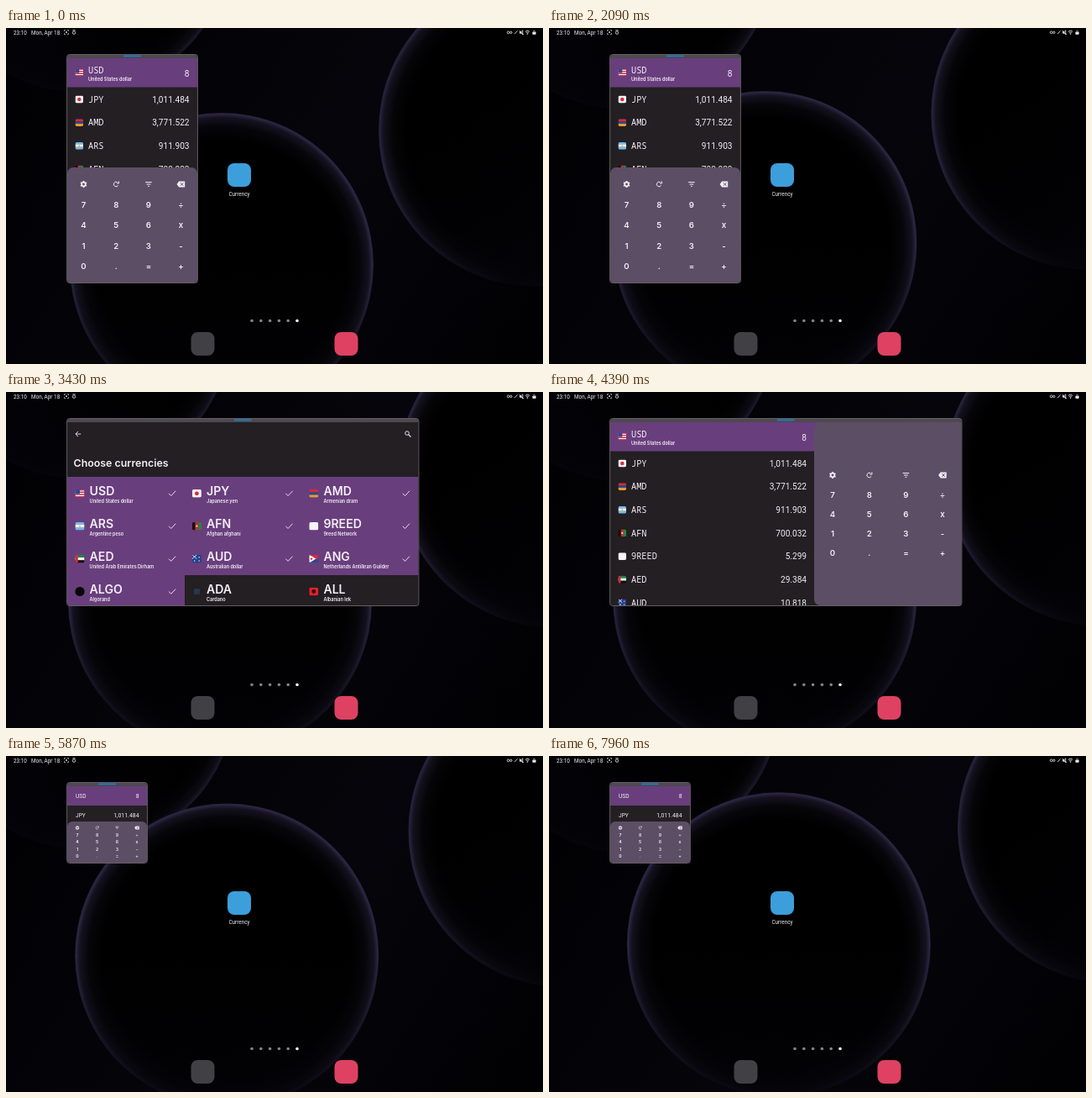
An HTML page with a canvas that plays this animation: 640 by 400 pixels, repeating every 8000 ms.

```html
<!DOCTYPE html>
<html lang="en">
<head>
<meta charset="utf-8">
<title>Currency window resizing</title>
<style>
  html, body { margin: 0; width: 100%; height: 100%; overflow: hidden; background: #000; }
  canvas { display: block; width: 640px; height: 400px; }
</style>
</head>
<body>
<canvas width="640" height="400"></canvas>
<script>
const ctx = document.querySelector('canvas').getContext('2d');
const LOOP = 8000, TAU = Math.PI * 2;
const LEFT = 73, TOP = 32;
const PURPLE = '#693e7d', DARK = '#231f23', PAD = '#5c4e65', WHITE = '#f4eef6';
const SANS = 'Roboto, sans-serif', ROUND = 'Inter, sans-serif', MONO = '"Noto Sans Mono", monospace';

const currencies = [
  ['USD', 'United States dollar', '8'],
  ['JPY', 'Japanese yen', '1,011.484'],
  ['AMD', 'Armenian dram', '3,771.522'],
  ['ARS', 'Argentine peso', '911.903'],
  ['AFN', 'Afghan afghani', '700.032'],
  ['9REED', '9reed Network', '5.299'],
  ['AED', 'United Arab Emirates Dirham', '29.384'],
  ['AUD', 'Australian dollar', '10.818'],
  ['ANG', 'Netherlands Antillean Guilder', ''],
  ['ALGO', 'Algorand', ''],
  ['ADA', 'Cardano', ''],
  ['ALL', 'Albanian lek', '']
];

const layouts = {
  tall: { w: 155, h: 271, pad: [73, 166, 155, 137], radii: [7, 7, 0, 0], cols: [92.5, 38.7], rows: [186, 24.4], key: 9.6, right: 218.5 },
  wide: { w: 418.5, h: 222, pad: [316, 36, 176, 218], radii: [7, 0, 0, 7], cols: [338, 43.7], rows: [99, 23.1], key: 9.6, right: 307 },
  small: { w: 95, h: 95, pad: [73, 78, 95, 49], radii: [6, 6, 0, 0], cols: [85, 23.7], rows: [85.5, 8.5], key: 5.2, right: 158.5 }
};

// start time, layout, page
const scenes = [
  [0, 'tall', calculator], [620, 'tall', chooser], [1900, 'tall', calculator],
  [2690, 'wide', calculator], [3050, 'wide', chooser], [4300, 'wide', calculator],
  [5330, 'small', calculator], [6050, 'small', chooser], [7150, 'small', calculator]
];

// time, then the centres of the three planets
const drift = [
  [0, 257, 282, 629, 122, 88, -105],
  [1170, 258, 264, 636, 108, 86, -90],
  [2650, 257, 251, 643, 98, 88, -82],
  [3430, 255, 250, 652, 95, 88, -78],
  [5260, 259, 243, 661, 91, 91, -72],
  [6780, 269.5, 229.5, 669.5, 88, 94, -68],
  [8000, 274, 224, 672, 85, 95, -66]
];

const clamp = v => Math.max(0, Math.min(1, v));
const mix = (a, b, k) => a + (b - a) * k;
const ease = k => k * k * (3 - 2 * k);

function driftAt(t) {
  const i = Math.max(1, drift.findIndex(row => row[0] >= t));
  const a = drift[i - 1], b = drift[i], k = (t - a[0]) / (b[0] - a[0]);
  return a.map((v, n) => mix(v, b[n], k)).slice(1);
}

function rect(x, y, w, h, color, radius = 0) {
  ctx.fillStyle = color;
  ctx.beginPath();
  ctx.roundRect(x, y, w, h, radius);
  ctx.fill();
}

function disc(x, y, r, color) {
  ctx.fillStyle = color;
  ctx.beginPath();
  ctx.arc(x, y, r, 0, TAU);
  ctx.fill();
}

function polygon(points, color) {
  ctx.fillStyle = color;
  ctx.beginPath();
  points.forEach(([x, y]) => ctx.lineTo(x, y));
  ctx.fill();
}

function line(points, width = 1.1, color = WHITE) {
  ctx.strokeStyle = color;
  ctx.lineWidth = width;
  ctx.beginPath();
  points.forEach(([x, y]) => ctx.lineTo(x, y));
  ctx.stroke();
}

function ring(x, y, r, width, from = 0, to = TAU) {
  ctx.strokeStyle = WHITE;
  ctx.lineWidth = width;
  ctx.beginPath();
  ctx.arc(x, y, r, from, to);
  ctx.stroke();
}

// y is the middle of the capitals
function text(str, x, y, size, family, { weight = 400, align = 'left', color = WHITE } = {}) {
  ctx.font = `${weight} ${size}px ${family}`;
  ctx.textAlign = align;
  ctx.fillStyle = color;
  ctx.fillText(str, x, y + size * .36);
}

function clipped(x, y, w, h, radius, draw) {
  ctx.save();
  ctx.beginPath();
  ctx.roundRect(x, y, w, h, radius);
  ctx.clip();
  draw();
  ctx.restore();
}

// The rim darkens from the first offset to the second, both in radii.
function planet(x, y, r, bright, x0, y0, x1, y1) {
  const body = ctx.createRadialGradient(x, y, 0, x, y, r);
  const stops = [[0, 0], [.82, 0], [.91, .1], [.97, .36], [.992, .75], [1, .6]];
  for (const [at, v] of stops) {
    const k = v * bright;
    body.addColorStop(at, `rgb(${58 * k},${51 * k},${88 * k})`);
  }
  disc(x, y, r, body);
  const shade = ctx.createLinearGradient(x + x0 * r, y + y0 * r, x + x1 * r, y + y1 * r);
  shade.addColorStop(0, 'rgba(3,3,7,0)');
  shade.addColorStop(1, 'rgba(3,3,7,.95)');
  disc(x, y, r + .5, shade);
}

function wallpaper(t) {
  const [ax, ay, bx, by, cx, cy] = driftAt(t);
  const sky = ctx.createLinearGradient(0, 0, 640, 400);
  sky.addColorStop(0, '#010103');
  sky.addColorStop(.55, '#05050b');
  sky.addColorStop(1, '#010103');
  rect(0, 0, 640, 400, sky);
  planet(cx, cy, 181, .6, .6, .4, -.2, .9);
  planet(bx, by, 185, .9, -.7, .1, -.1, .95);
  planet(ax, ay, 181, 1, 0, 0, 0, 1.05);
}

function statusBar() {
  text('23:10', 9, 5.2, 6.4, SANS);
  text('Mon, Apr 18', 30, 5.2, 6.4, SANS);
  for (const [sx, sy] of [[-1, -1], [1, -1], [1, 1], [-1, 1]])
    line([[72 + sx, 5 + sy * 2.5], [72 + sx * 2.5, 5 + sy * 2.5], [72 + sx * 2.5, 5 + sy]], .6);
  disc(72, 5, .9, WHITE);
  ring(81, 5.6, 1.7, .8);
  line([[79.3, 2.8], [82.7, 2.8]], .8);
  ring(598.6, 5.3, 1.4, .8);
  ring(601.8, 5.3, 1.2, .8);
  line([[606, 7.2], [609.5, 3.4]], .8);
  rect(612, 4.2, 2, 2.2, WHITE);
  line([[613, 5.3], [615.8, 2.8], [615.8, 7.8], [613, 5.3]], .8);
  line([[611.8, 2.8], [617, 8]], .7);
  ring(621.5, 7, 3.7, .9, -2.35, -.8);
  ring(621.5, 7, 1.9, .9, -2.35, -.8);
  disc(621.5, 7, .8, WHITE);
  rect(627.5, 4.8, 4, 3, WHITE, .5);
  ring(629.5, 4.6, 1.2, .7, Math.PI, TAU);
}

function home() {
  statusBar();
  rect(264, 161, 28, 28, '#3c9fdb', 8);
  text('Currency', 278, 198, 6.4, SANS, { align: 'center' });
  for (let i = 0; i < 6; i++) disc(293 + i * 10.8, 348.5, 1.8, i < 5 ? '#858588' : '#fff');
  rect(220.5, 362, 28, 28, '#414044', 8);
  rect(391.5, 362, 28, 28, '#df4162', 8);
}

function flag(code, cx, cy, w, h) {
  const x = cx - w / 2, y = cy - h / 2;
  const rows = (...colors) => colors.forEach((c, i) => rect(x, y + i * h / colors.length, w, h / colors.length + .1, c));
  const columns = (...colors) => colors.forEach((c, i) => rect(x + i * w / colors.length, y, w / colors.length + .1, h, c));
  const red = '#d6293c', white = '#f5f5f5', blue = '#30488f';
  const designs = {
    USD() { rows(red, white, red, white, red, white, red); rect(x, y, w * .5, h * .55, blue); },
    JPY() { rows(white); disc(cx, cy, h * .25, red); },
    AMD() { rows(red, blue, '#e99b28'); },
    ARS() { rows('#76b7e6', white, '#76b7e6'); disc(cx, cy, 1, '#e6b23b'); },
    AFN() { columns('#111', '#c62d2d', '#27843c'); disc(cx, cy, 1.1, '#e8cfcb'); },
    '9REED'() { rows(white); },
    AED() { rows('#16864a', white, '#111'); rect(x, y, w * .3, h, red); },
    AUD() {
      rows('#23408c');
      line([[x, y], [cx, cy]], .9); line([[x, cy], [cx, y]], .9);
      disc(x + w * .25, y + h * .75, .8, white);
      disc(x + w * .75, y + h * .3, .7, white);
      disc(x + w * .75, y + h * .75, .7, white);
    },
    ANG() {
      rows(red, blue);
      polygon([[x, y], [x + w * .75, cy], [x, y + h]], white);
      disc(x + w * .25, cy, 1.2, red);
    },
    ALL() { rows('#e3202a'); disc(cx, cy, h * .25, '#2a0a0c'); }
  };
  if (code === 'ALGO') disc(cx, cy, 5.6, '#070707');
  else if (code === 'ADA') rect(cx - 3.5, cy - 3.5, 7, 7, '#25394c', 1);
  else clipped(x, y, w, h, 1.8, designs[code]);
}

function check(x, y) { line([[x - 4, y], [x - 1.3, y + 2.8], [x + 4.2, y - 3]], .9); }

function arrow(x, y) {
  line([[x + 3.2, y], [x - 3, y]], .9);
  line([[x, y - 3.1], [x - 3.1, y], [x, y + 3.1]], .9);
}

function search(x, y) {
  ring(x - 1, y - 1, 2.3, .9);
  line([[x + .7, y + .7], [x + 3.5, y + 3.5]], 1.1);
}

function keypadIcons(xs, y, s) {
  const at = (x, draw) => { ctx.save(); ctx.translate(x, y); ctx.scale(s, s); draw(); ctx.restore(); };
  at(xs[0], () => {
    ring(0, 0, 2.3, 1.7);
    for (let i = 0; i < 6; i++) {
      const a = i * TAU / 6 + TAU / 12, c = Math.cos(a), n = Math.sin(a);
      line([[2.6 * c, 2.6 * n], [4 * c, 4 * n]], 1.9);
    }
  });
  at(xs[1], () => {
    ring(0, 0, 2.8, 1, .5, 5.4);
    line([[3.2, -3.5], [3.2, -1], [.8, -1]], 1);
  });
  at(xs[2], () => [3.8, 2.4, .9].forEach((half, i) => line([[-half, i * 2.4 - 2.4], [half, i * 2.4 - 2.4]], 1)));
  at(xs[3], () => {
    polygon([[-5, 0], [-2.4, -3.6], [4.6, -3.6], [4.6, 3.6], [-2.4, 3.6]], WHITE);
    line([[-.8, -1.8], [2.8, 1.8]], 1, PAD);
    line([[2.8, -1.8], [-.8, 1.8]], 1, PAD);
  });
}

function calculator(name, box) {
  const small = name === 'small';
  rect(LEFT, 36, box.w, small ? 23 : 34.5, PURPLE);
  currencies.slice(0, small ? 2 : 8).forEach(([code, label, value], i) => {
    if (small) {
      const y = 48 + i * 23;
      text(code, 83, y, 6.6, SANS);
      text(value, box.right, y, 6.9, SANS, { align: 'right' });
      return;
    }
    const y = i ? 85 + (i - 1) * 27.65 : 54;
    flag(code, 87.3, i ? y : 53, 9.6, 8.8);
    text(code, 98, i ? y : 50.3, 10.3, MONO);
    if (!i) text(label, 98, 60.6, 5.5, ROUND, { weight: 600 });
    text(value, box.right, y, 10.1, SANS, { align: 'right' });
  });

  rect(...box.pad, PAD, box.radii);
  const xs = [0, 1, 2, 3].map(i => box.cols[0] + i * box.cols[1]);
  keypadIcons(xs, box.rows[0], small ? .58 : 1);
  ['789÷', '456x', '123-', '0.=+'].forEach((row, r) => [...row].forEach((key, c) =>
    text(key, xs[c], box.rows[0] + (r + 1) * box.rows[1], box.key, ROUND, { weight: 600, align: 'center' })));
}

function chooser(name, box) {
  const bold = { weight: 600 };
  const headY = name === 'tall' ? 53 : 50;
  arrow(86, headY);
  search(LEFT + box.w - 12.5, headY);
  if (name === 'small') text('Choose', 98, 50, 9.6, ROUND, bold);
  else text('Choose currencies', 80.5, name === 'tall' ? 88.5 : 85, 12.4, ROUND, bold);

  if (name === 'wide') {
    rect(LEFT, 101, box.w, 117, PURPLE);
    rect(LEFT, 218, 140, 36, PURPLE);
    currencies.forEach(([code, label], i) => {
      const col = i % 3, row = Math.floor(i / 3);
      const x = LEFT + col * 139.4, y = 101 + row * 38.9;
      flag(code, x + 15, y + 19.8, 11, 9.6);
      text(code, x + 26.6, y + 17.2, 14.1, ROUND, bold);
      text(label, x + 26.6, y + 28.9, 5.5, ROUND, bold);
      if (i < 10) check(x + 125, y + 19.8);
    });
    return;
  }

  const small = name === 'small';
  if (!small) rect(LEFT, 36, box.w, 3.7, PURPLE);
  const [first, pitch, height] = small ? [63.5, 32, 28.5] : [104.5, 36.6, 33.5];
  currencies.slice(0, small ? 2 : 6).forEach(([code, label], i) => {
    const y = first + i * pitch;
    rect(LEFT, y, box.w, height, PURPLE);
    if (small) {
      text(code, 88.5, y + 11.2, 6.5, ROUND, bold);
      text(label, 88.5, y + 18.8, 5.5, ROUND, bold);
      check(153, y + 14.2);
    } else {
      flag(code, 87.3, y + 16.8, 9.8, 8.4);
      text(code, 98, y + 14, 9.9, ROUND, bold);
      text(label, 98, y + 23.5, 5.5, ROUND, bold);
      check(213, y + 16.8);
    }
  });
}

function appWindow([, name, page], border) {
  const box = layouts[name];
  clipped(LEFT, TOP, box.w, box.h, 3, () => {
    rect(LEFT, TOP, box.w, box.h, DARK);
    rect(LEFT, TOP, box.w, 4, '#4d494f');
    rect(LEFT + box.w / 2 - 10.5, TOP + .5, 21, 1.8, '#1c7fc4', 1);
    page(name, box);
  });
  if (!border) return;
  ctx.strokeStyle = '#625e64';
  ctx.lineWidth = 1;
  ctx.beginPath();
  ctx.roundRect(LEFT - .4, TOP - .5, box.w + .8, box.h + 1, 3);
  ctx.stroke();
}

function preview(x, y, color) {
  const w = Math.max(95, x - LEFT), h = Math.max(96, y - 31);
  ctx.globalAlpha = .3;
  rect(LEFT, 30.5, w, h, color, 2);
  ctx.globalAlpha = 1;
  ctx.strokeStyle = color;
  ctx.lineWidth = 1.6;
  ctx.beginPath();
  ctx.roundRect(LEFT - .3, 30.2, w + .6, h + .6, 2);
  ctx.stroke();
}

function touch(x, y) {
  disc(x, y, 5.4, 'rgba(70,70,74,.75)');
  disc(x, y, 4.2, 'rgba(190,190,194,.85)');
  disc(x, y, 1.8, 'rgba(150,150,156,.8)');
}

function resizing(t) {
  if (t > 2300 && t < 2690) {
    const k = ease(clamp((t - 2320) / 260));
    const x = mix(228, 492, k), y = mix(303, 255, k);
    if (t < 2610) preview(x, y, '#3d8fd6');
    touch(x, y);
  }
  if (t > 4930 && t < 5330) {
    const k = ease(clamp((t - 4950) / 270));
    const x = mix(491, 90, k), y = mix(254, 67.5, k);
    preview(x, y, x < 168 && y < 127 ? '#f0605f' : '#3d8fd6');
    touch(x, y);
  }
}

function draw(now) {
  const t = now % LOOP;
  wallpaper(t);
  home();
  const index = scenes.findLastIndex(scene => scene[0] <= t);
  const current = scenes[index], previous = scenes[index - 1];
  const border = t < 2500 || t > 2690;
  const fade = clamp((t - current[0]) / 90);
  if (previous && previous[1] === current[1] && fade < 1) {
    appWindow(previous, border);
    ctx.globalAlpha = fade;
  }
  appWindow(current, border);
  ctx.globalAlpha = 1;
  resizing(t);
}

const start = performance.now();
function tick() {
  draw(performance.now() - start);
  requestAnimationFrame(tick);
}
tick();
</script>
</body>
</html>
```
